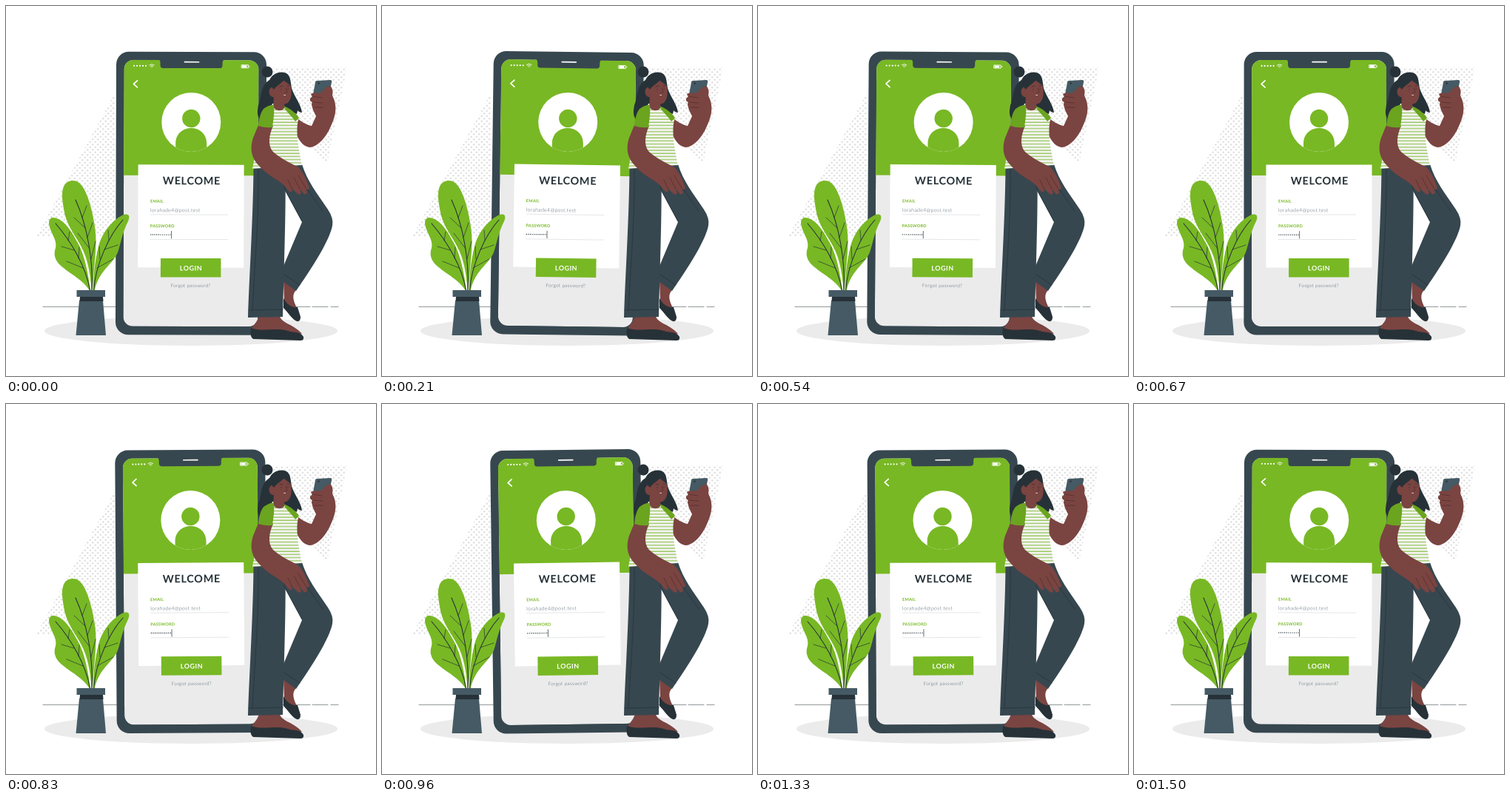
Animation, 500 px wide and 500 px high, one loop 1.54 s. Source, as an HTML page:

```html
<!DOCTYPE html>
<html lang="en">
<head>
<meta charset="utf-8">
<title>Login</title>
<style>
html, body { margin: 0; width: 100%; height: 100%; overflow: hidden; background: #fff; }
svg { display: block; width: 100vw; height: 100vh; font-family: Lato, sans-serif; }
.green { fill: #78b824; }
.sleeve { fill: #6ba41f; }
.slate { fill: #37474f; }
.steel { fill: #455a64; }
.ink { fill: #263238; }
.skin { fill: #7a4441; }
.line { fill: none; stroke: #263238; stroke-width: .7; stroke-linecap: round; stroke-linejoin: round; }
.fold { fill: none; stroke: #57302e; stroke-width: .8; stroke-linecap: round; }
.white { fill: none; stroke: #fff; stroke-width: 1.7; stroke-linecap: round; stroke-linejoin: round; }
.label { font-size: 5.6px; font-weight: 700; letter-spacing: .2px; }
.thin { fill: #455a64; font-weight: 300; letter-spacing: .35px; }
</style>
</head>
<body>
<svg viewBox="0 0 500 500">
  <defs>
    <pattern id="dots" width="7" height="7" patternUnits="userSpaceOnUse">
      <g fill="#e0e0e0"><circle cx="1.75" cy="1.75" r="1.3"/><circle cx="5.25" cy="5.25" r="1.3"/></g>
    </pattern>
    <pattern id="stripes" width="8" height="4.2" patternUnits="userSpaceOnUse">
      <rect width="8" height="4.2" fill="#f5f5f5"/><rect y="1.2" width="8" height="1.2" fill="#8dc24b"/>
    </pattern>
    <clipPath id="avatar"><circle cx="250" cy="157" r="40"/></clipPath>
    <clipPath id="screen"><rect x="159" y="73" width="182" height="360" rx="13"/></clipPath>
  </defs>

  <path fill="url(#dots)" d="M147 118V311H41ZM350 83H461L434 212L395 178Z"/>
  <path class="line" style="stroke-width:.5" d="M50 406.500H158M350 406.500H411M414 406.500H435M439 406.500H449"/>
  <ellipse cx="250" cy="439" rx="198" ry="20" fill="#ebebeb"/>

  <g id="phone">
    <rect class="slate" x="148.500" y="62" width="203" height="382.500" rx="17"/>
    <g clip-path="url(#screen)">
      <rect x="159" y="73" width="182" height="360" fill="#ebebeb"/>
      <rect class="green" x="159" y="73" width="182" height="156"/>
    </g>
    <path class="slate" d="M205 72Q208 73 208 77V80Q208 84 212 84H288Q292 84 292 80V77Q292 73 295 72Z"/>
    <path class="white" d="M241 75.700H260M177 101L172 105.500L177 110"/>
    <path class="white" style="stroke-width:2.200" stroke-dasharray="0 4" d="M172.500 81H189"/>
    <path class="white" style="stroke-width:.9" d="M193.300 80Q196.500 77.500 199.700 80M194.700 81.600Q196.500 80.200 198.300 81.600M196.500 83V83.100M318 79.500H327V83.500H318ZM328.500 81V82"/>
    <rect x="318.500" y="80" width="6.500" height="3" fill="#fff"/>

    <circle cx="250" cy="157" r="40" fill="#fff"/>
    <circle class="green" cx="250" cy="152" r="12.200"/>
    <path class="green" clip-path="url(#avatar)" d="M229 200V186C229 158 271 158 271 186V200Z"/>

    <rect x="178.500" y="214.500" width="143" height="139" fill="#fff"/>
    <text class="ink" x="250.900" y="241.200" text-anchor="middle" font-size="14.400" font-weight="700" letter-spacing=".7">WELCOME</text>
    <text class="green label" x="195" y="265.800">EMAIL</text>
    <text class="thin" x="195" y="278.300" font-size="6.900" letter-spacing=".7">lorahade4@post.test</text>
    <text class="green label" x="195" y="299.300">PASSWORD</text>
    <path d="M195 282H300.500M195 315.500H300.500" stroke="#dcdcdc" stroke-width=".7"/>
    <path class="line" style="stroke-width:1.400" stroke-dasharray="0 2.600" d="M196 309.200H222.500"/>
    <path class="line" d="M223.700 304.500V314"/>
    <rect class="green" x="209.200" y="341" width="81.500" height="25.500"/>
    <text x="250.200" y="357.500" text-anchor="middle" font-size="9" font-weight="700" letter-spacing=".5" fill="#fff">LOGIN</text>
    <text class="thin" x="250" y="380" text-anchor="middle" font-size="6.400">Forgot password?</text>
  </g>

  <g id="plant">
    <g class="green">
      <path d="M115.500 385C114 360 110 341 102 326C94 310 81 296 78 274C76 262 75 254 77 247C79 237 88 234 96 237C108 243 116 272 120 298C124 325 119 345 117 385Z"/>
      <path d="M113 385C105 370 86 362 73 350C64 341 65 333 67 327C70 315 58 305 58 292C59 284 66 285 73 289C84 296 90 308 97 320C106 336 111 360 114 385Z"/>
      <path d="M118 385C118 365 120 345 125 325C130 305 145 288 159 282C168 280 167 286 165 291C158 305 156 316 152 330C147 348 126 355 119.500 385Z"/>
    </g>
    <path class="line" style="stroke-width:1.100" d="M116 384C118 345 110 297 94 262M113.500 384C108 352 88 318 67 294M118.500 384C121 350 139 310 158 289"/>
    <path class="line" d="M103 286L109 270M107 300L92 286M110 313L117 293M113 328L97 307M115 342L121 318M84 317L86 305M92 330L75 325M98 341L99 326M104 354L82 345M139 317L138 303M133 329L151 323M127 342L126 325M123 354L145 342"/>
    <path class="steel" d="M95.500 384H134V393H95.500ZM99 398H131L135 445H94.500Z"/>
    <path class="ink" d="M100 393H131L131.500 399H99.500Z"/>
  </g>

  <g id="woman">
    <g class="ink">
      <circle cx="353" cy="89" r="7.500"/>
      <path d="M356 100C360 91 371 87 379 91C386 95 384 106 387 114C391 124 399 134 400 144C396 144 394 141 394 141L393 146C386 144 376 139 370 131L360 132C357 140 354 148 345 154C338 150 340 141 341 134C346 123 343 108 356 100Z"/>
    </g>

    <path class="skin" d="M375 372L392 384C386 390 388 398 393 408L396 420L376 400Z"/>
    <path class="ink" d="M375 395C379 403 386 408 394 407L398 420Q398 427 393 426C386 423 382 415 375 408Z"/>
    <path class="slate" d="M362 217L400 214C407 237 421 254 435 275Q443 287 441 297C437 318 412 356 392 385L368 368L400 292L374 244Z"/>
    <path class="skin" d="M342 418H370C371 429 388 429 400 443L331 441C331 432 340 429 342 418Z"/>
    <path class="ink" d="M331 435C346 441 365 434 381 439C390 442 397 439 402 447Q403 452 398 452L334 450Q329 447 331 435Z"/>
    <path class="slate" d="M334.500 218L377 214C379 260 376 340 374 420L327 421C329 360 334 285 334.500 218Z"/>
    <path class="line" d="M341 221C342 285 336 350 333 411M328 411L374 410M376 220V246L400 291M376 363L397 377M393 217C400 240 416 260 428 277"/>

    <path class="skin" d="M389 148C398 156 407 161 413 162L419 149C417 144 412 137 414 131L438 108Q443 112 441 121C448 134 446 147 440 160C433 178 421 190 411 191C399 190 394 177 387 164Z"/>
    <path class="steel" d="M420 101L438 100Q441 100 440 103L437 119L415 119L418 103Q418 101 420 101Z"/>
    <circle class="ink" cx="422.500" cy="104.500" r="1.200"/>
    <path class="skin" d="M438 108C432 109 429 114 426 117L413 118Q411 120 414 122L411 125Q410 129 414 130Q411 134 416 137L428 138L441 126V115Z"/>
    <path class="fold" d="M414 122L427 124M414 130L428 131M417 137L428 137"/>

    <path fill="url(#stripes)" d="M357 136C365 142 374 139 377 136L396 151C390 166 396 196 400 215L333 220C338 198 342 160 351 141Z"/>
    <path class="sleeve" d="M375 135C385 139 391 144 396 151L391 156C385 147 377 142 375 135Z"/>
    <path class="skin" d="M362 122H377L376 138C372 143 364 142 361 136Z"/>
    <path class="skin" d="M360 109C365 105 371 103 374 98C377 104 384 105 385 109C387 119 385 129 379 132C373 133 367 129 364 123Q358 124 356 119Q354 112 360 109Z"/>
    <path class="ink" d="M358 108C364 94 374 93 379 95C377 103 367 105 362 113Z"/>
    <path class="line" d="M370 109L374 108M380 108L383 108M372 112.500V113.500M381 112V113"/>
    <path class="fold" d="M378 111L380 117L377 117.500"/>
    <path d="M374.500 119.500Q376.500 121 378 119.500Q377.500 122.500 374.500 119.500Z" fill="#fff"/>
    <path class="line" d="M389 123L397 142M387 127L393 143"/>

    <path class="skin" d="M341 161L361 162C355 175 354 188 360 196C368 204 381 211 394 217C401 223 407 236 410 246Q408 250 405 246L407 252Q405 257 401 252L397 247L399 253Q396 257 392 252L385 245L387 250Q384 254 379 246C372 236 355 231 342 216C330 204 330 190 334 178Z"/>
    <path class="fold" d="M395 229L405 246M389 232L397 247M381 235L386 246"/>
    <path class="sleeve" d="M348 139C352 136 358 133 362 134C363 146 361 156 360 164Q350 165 341 162C342 152 344 144 348 139Z"/>
  </g>
</svg>
<script>
const LOOP = 1540, PERIOD = 1500, PEAK = 312, MAX_ANGLE = 1;
const phone = document.getElementById('phone');

// Triangle wave: constant-speed swing between +MAX_ANGLE and -MAX_ANGLE.
function swing(ms) {
  const phase = ((ms - PEAK + PERIOD) % PERIOD) / PERIOD;
  return MAX_ANGLE * (Math.abs(phase - 0.5) * 4 - 1);
}

function draw() {
  const angle = swing(performance.now() % LOOP);
  phone.setAttribute('transform', `rotate(${angle.toFixed(4)} 250 253.3)`);
  requestAnimationFrame(draw);
}
draw();
</script>
</body>
</html>
```
